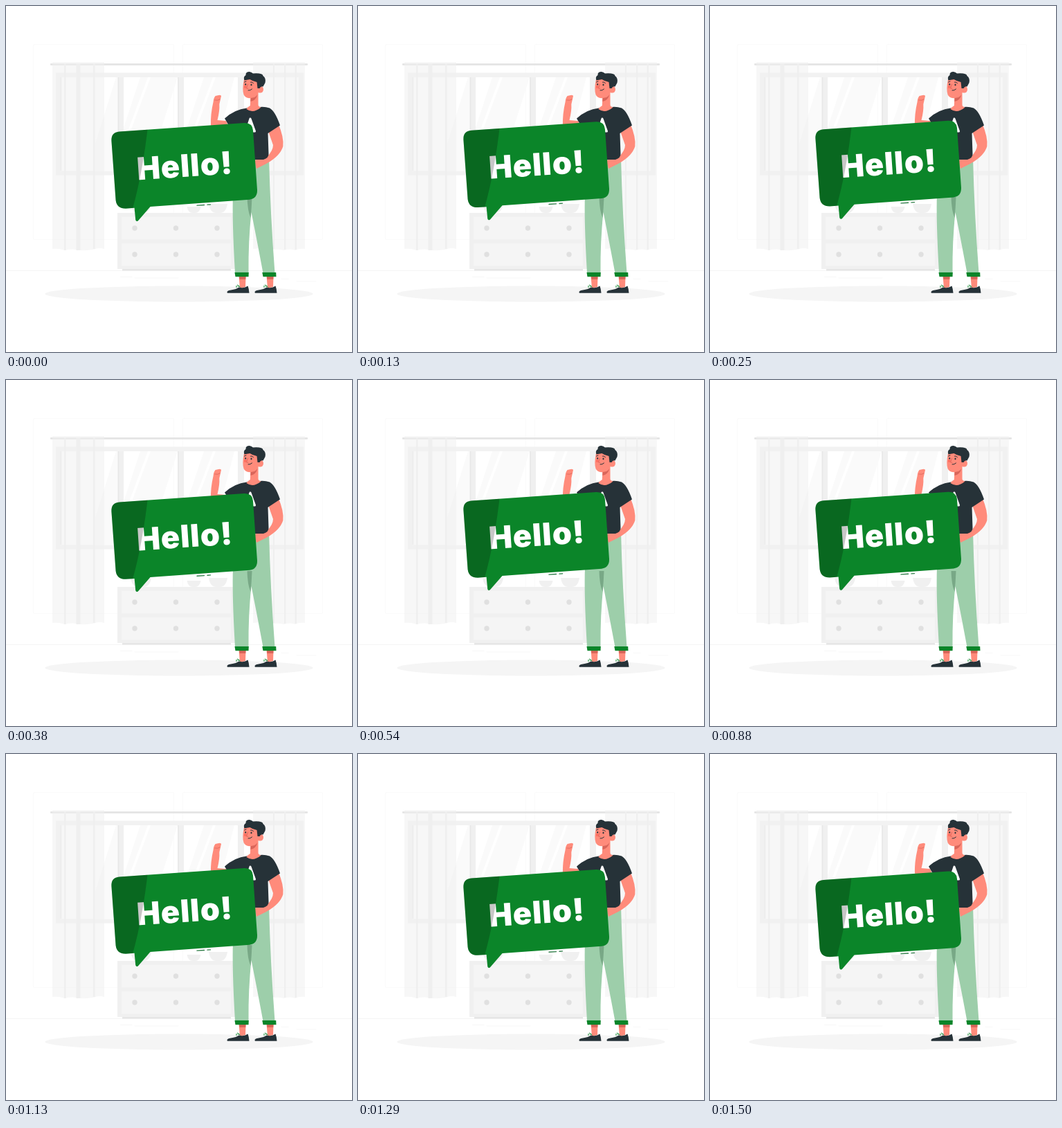
Animation of 500x500 px, one loop 1.54 s. Source, as an HTML page:

```html
<!DOCTYPE html>
<html lang="en">
<head>
<meta charset="utf-8">
<title>Hello!</title>
<style>
  html, body { margin: 0; width: 100%; height: 100%; overflow: hidden; background: #fff; }
  svg { display: block; width: 100%; height: 100%; }
  .line { fill: none; stroke-linecap: round; stroke-linejoin: round; }
  .skin { fill: #ff8b7b; }
  .dark { fill: #263238; }
  .green { fill: #0b8529; }
  .pants { fill: #9dceaa; }
  .hello { font: 900 45px Inter, "Liberation Sans", sans-serif; letter-spacing: 1px; fill: #fff; text-anchor: middle; }
</style>
</head>
<body>
<svg viewBox="0 0 500 500">
  <defs>
    <path id="balloon" d="M152.4 195.500Q151.800 183 164 182.200L344 169.700Q356 169 357 180.500L363 266.500Q363.400 278.800 352 280.400L208.500 290.600L191 310.800Q188 313 187.200 309.600L185.600 292.500L173 293.400Q160 293.400 158.600 281.500Z"/>
    <clipPath id="inside"><use href="#balloon"/></clipPath>
    <g id="shoe">
      <path class="skin" d="M336.500 390H346.500L346 406L338 408Z"/>
      <path d="M337 391H346.500L346.300 395H337.300Z" fill="#d9655a"/>
      <path class="dark" d="M319.500 414Q319 411.300 325 410.500Q333 409.400 336.500 406.500Q344 408.500 349.500 404.500Q351 408.500 351.500 414.800H320Z"/>
      <path class="line" d="M333 406.500V404.500M336 405.500L334.500 403M336.500 404L338 406" stroke="#0b8529" stroke-width="1"/>
    </g>
  </defs>

  <!-- room -->
  <g class="line" stroke="#fafafa">
    <rect x="39.500" y="55.500" width="203" height="282" rx="2"/>
    <rect x="255" y="55.500" width="202.500" height="282" rx="2"/>
    <path d="M0 382.300H500" stroke="#f4f4f4"/>
    <path d="M165 391.500H182M186 393H249M398 394.500H408M420 398H448" stroke="#f7f7f7"/>
  </g>
  <ellipse cx="250" cy="416" rx="193.500" ry="11.500" fill="#f5f5f5"/>

  <!-- window -->
  <path d="M159 103L128 202V238H155L162 215V103ZM194 103H248L205 238H170V176ZM286 103H330L295 238H257V190Z" fill="#fafafa"/>
  <path d="M205 103H209L181 178H177ZM299 103H303L270 190H266Z" fill="#fff"/>
  <path d="M72 96.500H430V244.500H72ZM79 103V238.500H423V103Z" fill="#f2f2f2" fill-rule="evenodd"/>
  <path d="M161.500 103H170V238.500H161.500ZM248 103H257V238.500H248ZM335 103H344V238.500H335Z" fill="#f0f0f0"/>
  <path d="M162.500 103V238M249 103V238M79.500 103V238" stroke="#e8e8e8" stroke-width="1.500"/>
  <rect x="64" y="83" width="372" height="2.800" rx="1" fill="#e4e4e4"/>

  <!-- curtains -->
  <g fill="#f0f0f0" fill-opacity=".55">
    <path d="M67 81H142V351Q134 349 128 351.500Q116 354 108 353Q94 350 85 353Q76 350 67 351Z"/>
    <path d="M357 81H432V351Q423 350 418 353Q410 350 402 353Q392 351 386 352Q372 349 357 351Z"/>
  </g>
  <path d="M84 83H86.500V353H84ZM101.500 83H107.500V353H101.500ZM126 83H128.500V351H126ZM386 83H388V351H386ZM402 83H404.200V352H402ZM417.500 83H420V352H417.500Z" fill="#efefef"/>

  <!-- dresser -->
  <path d="M168 380H325V382.500H168Z" fill="#e6e6e6"/>
  <path d="M161 299H331V380H161Z" fill="#f0f0f0"/>
  <path d="M167 304.500H325V337.500H167ZM167 343H325V375.500H167Z" fill="#f5f5f5"/>
  <g class="line" stroke="#e0e0e0" stroke-width="7.400">
    <path d="M186 321h0M245.500 321h0M305 321h0M186 359h0M245.500 359h0M305 359h0"/>
  </g>
  <path d="M261.500 290H281.500Q280 299 273 299H270Q263 299 261.500 290ZM293 286H320Q318 299 309 299H304Q295 299 293 286ZM180 286H210Q208 299 198 299H192Q182 299 180 286Z" fill="#f0f0f0"/>

  <!-- person -->
  <use href="#shoe"/>
  <use href="#shoe" x="40"/>
  <path class="pants" d="M328 215L380 220Q382 300 388.500 386H371.500Q361 330 354.500 298Q350 340 350.500 386H331Q326.500 310 328 270Z"/>
  <path d="M348.500 276H355.500Q355 290 353.500 306Q349 296 348.500 276Z" fill="#78a886"/>
  <path class="green" d="M330.500 385H350.800L350.500 391.300H331.500ZM370.300 385H390.200L390.500 391.300H371.500Z"/>

  <path class="skin" d="M318 166L305.500 165Q309 151 308.300 142L311 130Q310 128 307 129L302.500 130Q300 133 299.500 139Q295.500 156 296 172Q297 181 312 178L322 175Z"/>
  <path class="line" d="M302 136Q306 137 309 135" stroke="#d9655a" stroke-width=".8"/>
  <path class="skin" d="M378 178L393 169Q402 190 400.300 203Q396 217 376 228L362 235L359 223L377 218Q386 209 386 201Z"/>
  <path class="dark" d="M348 147.500Q330 149.500 316 162.500L325 178L332 174V215L356 222H372Q380 219 379.500 214L378.500 184L396 172.500Q389 152 381 147.500Q374 145 366 146Z"/>
  <path class="skin" d="M353.500 130L352.800 144Q348 147 347.500 149Q357 156 368.500 146.500Q364 145 364.500 142V125Z"/>
  <path d="M353.500 132Q359 134 363.500 128Q361 137 353.300 138Z" fill="#d9655a"/>
  <path class="skin" d="M344 106Q341 120 343.500 128Q346 134 354 133Q362 131 364.500 125Q371 127 372 121Q372 115 366 116L366 105Z"/>
  <path class="dark" d="M344.500 107.500Q342.500 102 346.500 100Q346 95 352 95Q355 95.500 357 97.500Q371 96.500 371.500 101Q376 104 374.500 111L371.500 116.500Q368 115.500 366.500 119H363.500L362.500 110Q356 108.500 352.500 106Q348 106.500 344.500 107.500Z"/>
  <circle cx="345.800" cy="117" r="2" fill="#ff6f61"/>
  <g class="line" stroke="#263238" stroke-width="1">
    <path d="M344.500 110L347 109M353.500 110Q356 109.500 357.500 111.500M350 122Q353 122.500 355.500 120"/>
    <path d="M346.200 113v.6M354.500 113.600v.6" stroke-width="2"/>
  </g>
  <path class="line" d="M349.500 113L347.500 119L350 119.300" stroke="#d9655a" stroke-width=".9"/>
  <path d="M353 163L347 181H359.500Z" fill="#fff" stroke="#fff" stroke-width="3" stroke-linejoin="round"/>

  <!-- speech bubble -->
  <g id="bubble">
    <path class="line" d="M276 288.800L286.500 288.200M291 287.800L295.500 287.500" stroke="#2f7d48" stroke-width="1.400"/>
    <use href="#balloon" class="green"/>
    <text class="hello" transform="translate(259.500 247.500) rotate(-3.900)">Hello!</text>
    <path d="M140 170H205.500Q198 240 183 293.500H140Z" clip-path="url(#inside)" opacity=".22"/>
  </g>
</svg>
<script>
  const LOOP = 1540, RISE = 10, TOP_TIME = 720;
  const bubble = document.getElementById("bubble");

  // Linear rise and fall, highest at TOP_TIME.
  function draw(now) {
    const gap = Math.abs(now % LOOP - TOP_TIME) / (LOOP / 2);
    const drop = gap > 1 ? 2 - gap : gap;
    bubble.setAttribute("transform", `translate(0 ${RISE * (drop - 1)})`);
    requestAnimationFrame(draw);
  }
  draw(performance.now());
</script>
</body>
</html>
```
